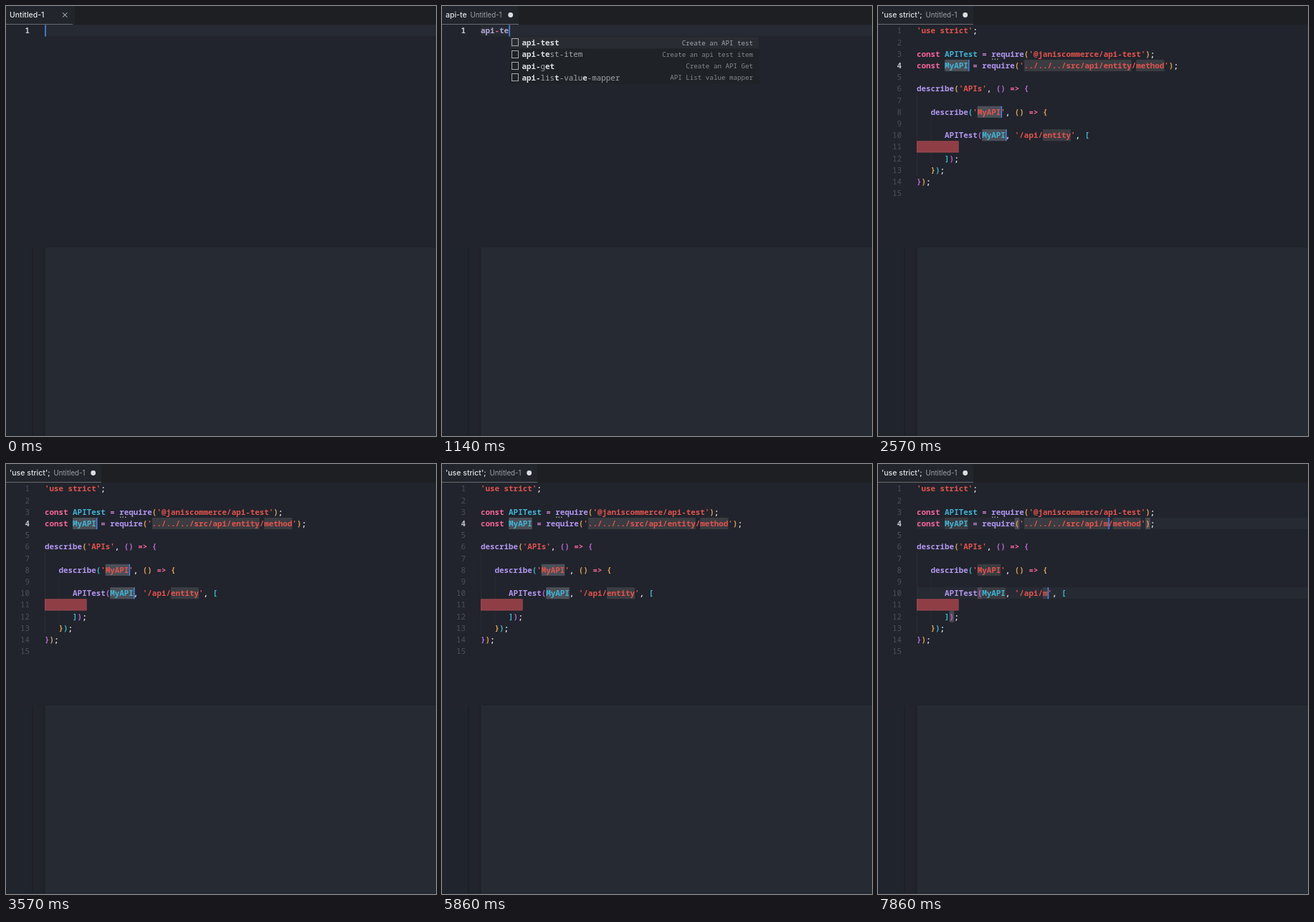
An HTML page with a canvas for the animation above (8000 ms loop, 600 px wide and 600 px high).

```html
<!DOCTYPE html>
<html lang="en">
<head>
<meta charset="utf-8">
<title>Snippet in an editor</title>
<style>
  html, body { margin: 0; width: 100%; height: 100%; overflow: hidden; background: #21242c; }
  canvas { display: block; width: 600px; height: 600px; }
</style>
</head>
<body>
<canvas id="stage" width="600" height="600"></canvas>
<script>
const ctx = document.getElementById('stage').getContext('2d');
const LOOP = 8000, LEFT = 54, CHAR = 6.516, TOP = 26.3, ROW = 16.2;
const ACCEPT = 2140, TO_PATH = 6800, BULB = 6930, TO_ENTITY = 7360, TYPE_M = 7790;

const MONO = '"Noto Sans Mono", "DejaVu Sans Mono", monospace';
const SANS = 'Inter, Roboto, sans-serif';
const color = {
  editor: '#21242c', bar: '#1e1f22', panel: '#262b33', cursor: '#4d86e6',
  string: '#e2534e', keyword: '#f8659b', func: '#b497f2', name: '#41b4d6',
  plain: '#d5d8dd', selected: '#4b5058', place: '#3a3c41', match: '#4c4952'
};
const bracketColors = ['#d9a05a', '#b866d6', '#3fb6c9'];

const typed = 'api-te';
const suggestions = [
  ['*api-test*', 'Create an API test'],
  ['*api-te*st-item', 'Create an api test item'],
  ['*api-*g*et*', 'Create an API Get'],
  ['*api-*lis*t*-valu*e*-mapper', 'API List value mapper']
];

const snippet = entity => [
  "'use strict';",
  '',
  "const APITest = require('@janiscommerce/api-test');",
  `const MyAPI = require('../../../src/api/${entity}/method');`,
  '',
  "describe('APIs', () => {",
  '',
  "   describe('MyAPI', () => {",
  '',
  `      APITest(MyAPI, '/api/${entity}', [`,
  '',
  '      ]);',
  '   });',
  '});',
  ''
];

const colX = col => LEFT + col * CHAR;
const rowY = line => TOP + (line - 1) * ROW;

function rect(x, y, w, h, fill) {
  ctx.fillStyle = fill;
  ctx.fillRect(x, y, w, h);
}

function text(str, x, y, fill, font, align = 'left') {
  ctx.font = font;
  ctx.fillStyle = fill;
  ctx.textAlign = align;
  ctx.fillText(str, x, y);
}

const mono = (weight, size = 10.86) => `${weight} ${size}px ${MONO}`;
const code = (str, line, col, fill, weight = 600) =>
  text(str, colX(col), rowY(line) + 12, fill, mono(weight));
const mark = (line, from, to, fill) =>
  rect(colX(from), rowY(line), (to - from) * CHAR, ROW, fill);
const cursor = (line, col) => rect(colX(col) + 0.2, rowY(line), 1.6, ROW, color.cursor);
const lineGlow = line => rect(LEFT, rowY(line), 600 - LEFT, ROW - 0.6, color.panel);

function drawBackground() {
  rect(0, 0, 600, 600, color.editor);
  rect(0, 0, 600, 26, color.bar);
  rect(55, 337, 545, 263, color.panel);
  rect(0, 337, 36, 263, '#20252d');
  rect(36, 337, 2, 263, '#1d2027');
  rect(51, 337, 3, 263, '#20222a');
}

function drawTab(title) {
  const small = `400 9.7px ${SANS}`, large = `500 10.5px ${SANS}`;
  ctx.font = large;
  const labelEnd = 5 + ctx.measureText(title || 'Untitled-1').width;
  const right = Math.round(labelEnd + (title ? 72 : 40));
  rect(0, 0, right + (title ? 0 : 3), 26, '#22252b');
  rect(0, 25, right, 1, '#686b70');
  text(title || 'Untitled-1', 5, 16.2, '#e2e4e7', large);
  if (title) {
    text('Untitled-1', labelEnd + 5, 16.2, '#9da0a5', small);
    ctx.fillStyle = '#dcdee0';
    ctx.beginPath();
    ctx.arc(right - 11.3, 12.5, 3.4, 0, Math.PI * 2);
    ctx.fill();
  } else {
    ctx.strokeStyle = '#d0d2d5';
    ctx.lineWidth = 1;
    ctx.beginPath();
    ctx.moveTo(79, 9.3); ctx.lineTo(85.4, 15.7);
    ctx.moveTo(85.4, 9.3); ctx.lineTo(79, 15.7);
    ctx.stroke();
  }
}

function drawNumbers(count, active) {
  for (let n = 1; n <= count; n++) {
    const on = n === active;
    text(n, 33, rowY(n) + 12, on ? '#c3c6ca' : '#4b5059', mono(on ? 600 : 400), 'right');
  }
}

// Asterisks toggle the bold, matched parts of a suggestion.
function drawSuggestions() {
  rect(95, 43, 347, 66, '#1f2227');
  rect(95, 43, 347, 16.5, '#292c32');
  suggestions.forEach(([label, detail], i) => {
    const y = 51.4 + i * ROW;
    ctx.strokeStyle = '#a4a7ab';
    ctx.lineWidth = 1;
    ctx.strokeRect(97.5, Math.round(y) - 5.5, 9, 10);
    let x = 111.5;
    label.split('*').forEach((part, k) => {
      const bold = k % 2;
      text(part, x, y + 3.7, bold ? '#dfe1e4' : '#a2a5aa', mono(bold ? 700 : 400));
      x += part.length * CHAR;
    });
    text(detail, 434, y + 3.4, i ? '#85888d' : '#a2a5a9', mono(400, 9.2), 'right');
  });
}

function drawTyping(t) {
  const count = Math.max(0, Math.min(typed.length, Math.floor((t - 130) / 160)));
  const lastKey = count ? 130 + count * 160 : 0;
  drawTab(typed.slice(0, count));
  lineGlow(1);
  drawNumbers(1, 1);
  [...typed.slice(0, count)].forEach((ch, i) =>
    code(ch, 1, i, ch === '-' ? color.keyword : '#b3a8d3'));
  if ((t - lastKey) % 1000 < 500) cursor(1, count);
  if (count) drawSuggestions();
}

function drawCode(lines) {
  let depth = 0;
  const colorOf = (token, next) => {
    if ('([{'.includes(token)) return bracketColors[depth++ % 3];
    if (')]}'.includes(token)) return bracketColors[--depth % 3];
    if (token[0] === "'") return color.string;
    if (token === 'const' || token === '=>') return color.keyword;
    if (token === '=') return '#c97fd2';
    if (/\w/.test(token)) return next === '(' ? color.func : color.name;
    return color.plain;
  };
  lines.forEach((line, i) => {
    for (const { 0: token, index } of line.matchAll(/'[^']*'|\w+|=>|\S/g)) {
      const fill = colorOf(token, line[index + token.length]);
      code(token, i + 1, index, fill, fill === color.keyword ? 700 : 600);
    }
  });
}

function drawBulb() {
  ctx.fillStyle = '#fcbf12';
  ctx.beginPath();
  ctx.arc(61, 63.3, 4.3, 0, Math.PI * 2);
  ctx.fill();
  rect(59, 66, 4, 2.5, '#fcbf12');
  rect(59, 68.5, 4, 2, '#3a3428');
}

function drawSnippet(t) {
  const replaced = t >= TYPE_M;
  const entity = replaced ? 'm' : 'entity';
  const end = 40 + entity.length, routeEnd = 27 + entity.length;
  const onName = t < TO_PATH, onPath = !onName && t < TO_ENTITY;
  const onEntity = t >= TO_ENTITY && !replaced;
  const nameFill = onName ? color.selected : color.place;
  const names = [[4, 6], [8, 13], [10, 14]];

  drawTab("'use strict';");
  if (replaced) [4, 10].forEach(lineGlow);
  drawNumbers(15, 4);

  rect(LEFT, rowY(7), 1, ROW * 7, '#292d34');
  rect(colX(3), rowY(9), 1, ROW * 4, '#292d34');
  names.forEach(([line, col]) => mark(line, col, col + 5, nameFill));
  mark(4, 23, end, color.place);
  mark(4, end + 1, end + 7, color.place);
  mark(10, 27, routeEnd, color.place);
  if (onPath) mark(4, 23, 40, color.selected);
  if (onEntity) {
    mark(4, 40, end, color.selected);
    mark(10, 27, routeEnd, color.selected);
  }
  if (replaced) {
    [[4, 21], [4, end + 8], [10, 13], [12, 7]].forEach(([line, col]) =>
      mark(line, col, col + 1, color.match));
  }
  mark(11, 0, 9, '#a0484f');
  rect(LEFT + 1, rowY(11) + 1, CHAR * 9 - 2, ROW - 2, '#8f3e46');

  drawCode(snippet(entity));
  for (let i = 0; i < 3; i++) rect(159 + i * 3.5, 73.5, 1.5, 1.5, '#9a9da2');

  if (onName) {
    if ((t - ACCEPT) % 1000 < 500) names.forEach(([line, col]) => cursor(line, col + 5));
  } else if (onPath) {
    cursor(4, 40);
    if (t >= BULB) drawBulb();
  } else {
    cursor(4, end);
    cursor(10, routeEnd);
  }
}

function frame(now) {
  const t = now % LOOP;
  drawBackground();
  (t < ACCEPT ? drawTyping : drawSnippet)(t);
  requestAnimationFrame(frame);
}
requestAnimationFrame(frame);
</script>
</body>
</html>
```
